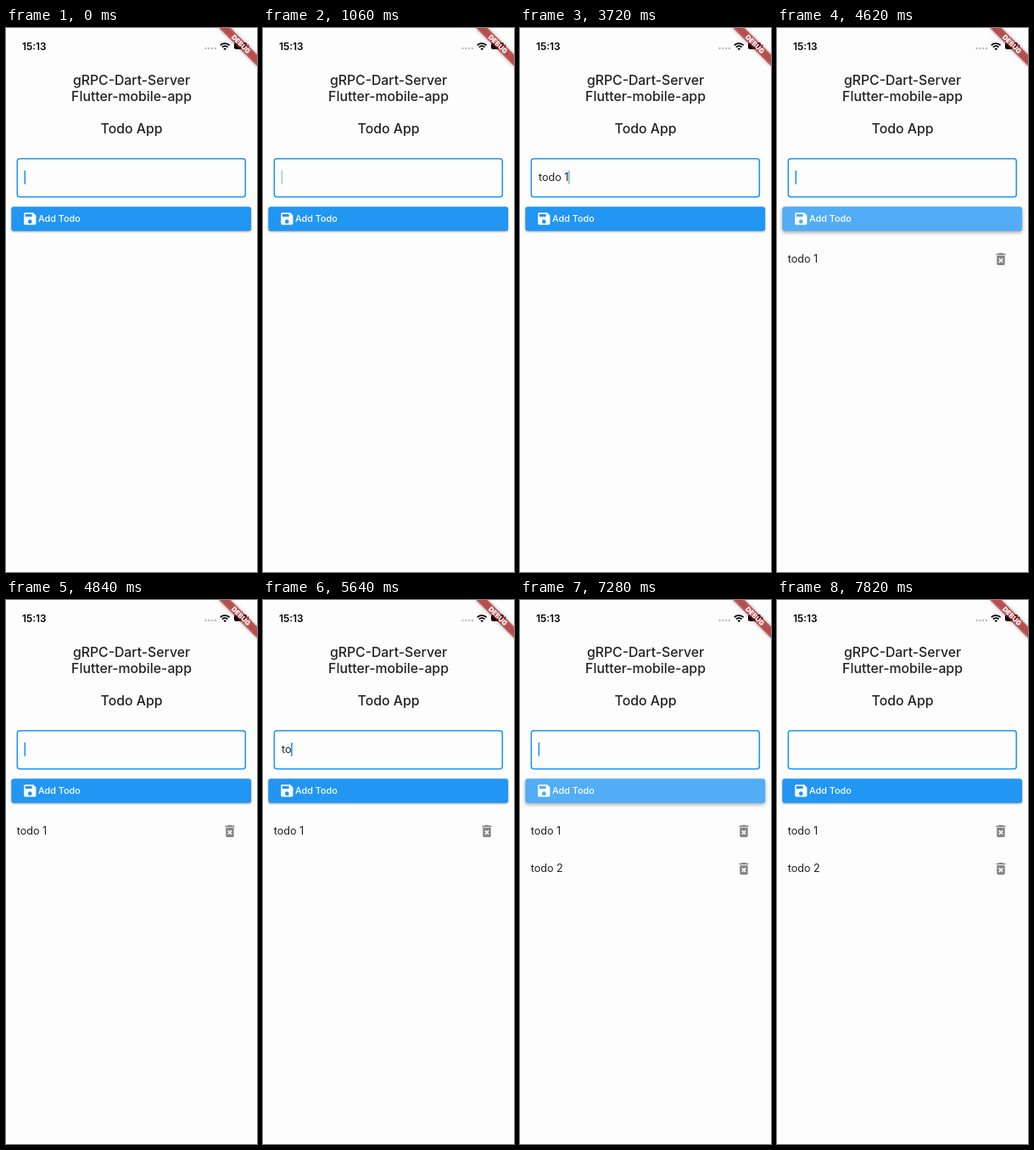
An HTML page for the animation above (8 s loop, 296 px wide and 640 px high).

```html
<!DOCTYPE html>
<html lang="en">
<head>
<meta charset="utf-8">
<title>Todo App</title>
<style>
  html, body { margin: 0; width: 100%; height: 100%; overflow: hidden; background: #fdfdfd; }
  svg { display: block; width: 296px; height: 640px; font: 12.6px Inter, "Open Sans", sans-serif; fill: #222; }
  .title { font-size: 15.8px; font-weight: 500; text-anchor: middle; }
  #typed { white-space: pre; }
</style>
</head>
<body>
<svg viewBox="0 0 296 640">
  <defs>
    <path id="trash" fill="#858585" d="M6 19c0 1.1.9 2 2 2h8c1.1 0 2-.9 2-2V7H6v12zm2.46-7.12l1.41-1.41L12 12.59l2.12-2.12 1.41 1.41L13.41 14l2.12 2.12-1.41 1.41L12 15.41l-2.12 2.12-1.41-1.41L10.59 14l-2.13-2.12zM15.5 4l-1-1h-5l-1 1H5v2h14V4z"/>
    <clipPath id="inside"><rect x="6.3" y="210.3" width="282.8" height="28.4" rx="3"/></clipPath>
  </defs>

  <!-- Status bar -->
  <g fill="#000">
    <text x="19" y="26" font-size="11.8" font-weight="600">15:13</text>
    <g fill="#bbb">
      <circle cx="235.5" cy="24" r="1.2"/><circle cx="239.3" cy="24" r="1.2"/>
      <circle cx="243.1" cy="24" r="1.2"/><circle cx="246.9" cy="24" r="1.2"/>
    </g>
    <g fill="none" stroke="#000" stroke-width="1.8">
      <path d="M252.8 20.3a7.6 7.6 0 0 1 10.8 0M254.9 22.6a4.7 4.7 0 0 1 6.6 0"/>
    </g>
    <path d="M258.2 26.2l-1.8-1.9a2.6 2.6 0 0 1 3.6 0z"/>
    <rect x="269" y="17" width="15" height="8" rx="2.2"/>
    <rect x="285" y="19.5" width="1.2" height="3" rx=".6"/>
  </g>

  <!-- Corner banner -->
  <g transform="translate(296 0) rotate(45)">
    <rect x="-32" y="22.1" width="64" height="9.5" fill="#b71c1c" fill-opacity=".67" style="filter:drop-shadow(0 0 2px #0007)"/>
    <text y="29.7" font-size="8" font-weight="900" fill="#fff" text-anchor="middle">DEBUG</text>
  </g>

  <g class="title">
    <text x="148" y="67">gRPC-Dart-Server</text>
    <text x="148" y="86">Flutter-mobile-app</text>
    <text x="148" y="124">Todo App</text>
  </g>

  <!-- Input -->
  <rect x="13.3" y="153.7" width="269" height="45" rx="3" fill="none" stroke="#2196f3" stroke-width="1.6"/>
  <text id="typed" x="22" y="180"></text>
  <rect id="cursor" y="167.7" width="1.6" height="16" rx=".5" fill="#2196f3"/>

  <!-- Button -->
  <rect id="button" x="6.3" y="210.3" width="282.8" height="28.4" rx="3" fill="#2196f3"/>
  <g clip-path="url(#inside)" fill="#fff">
    <rect id="glow" x="6" y="210" width="284" height="29"/>
    <circle id="splash" cx="130" cy="225"/>
  </g>
  <path fill="#fff" transform="translate(18.8 215) scale(.79)" d="M17 3H5c-1.11 0-2 .9-2 2v14c0 1.1.89 2 2 2h14c1.1 0 2-.9 2-2V7l-4-4zm-5 16c-1.66 0-3-1.34-3-3s1.34-3 3-3 3 1.34 3 3-1.34 3-3 3zm3-10H5V5h10v4z"/>
  <text x="38" y="228.4" font-size="10.8" font-weight="500" fill="#fff">Add Todo</text>

  <!-- List -->
  <g class="item">
    <text x="12.7" y="276">todo 1</text>
    <use href="#trash" transform="translate(254.5 262.4) scale(.79)"/>
  </g>
  <g class="item">
    <text x="12.7" y="320">todo 2</text>
    <use href="#trash" transform="translate(254.5 306.6) scale(.79)"/>
  </g>
</svg>
<script>
const LOOP = 8000, FADE = 150;
const typing = [
  [0, ''], [2150, 'o'], [2370, ''], [2480, 't'], [2590, 'to'], [2700, 'tod'], [2820, 'todo'],
  [3060, 'todo '], [3170, 'todo 1'], [4510, ''],
  [5410, 't'], [5640, 'to'], [5750, 'tod'], [5860, 'todo'], [5970, 'todo '], [6090, 'todo 2'], [7170, '']
];
// Times at which the cursor starts to fade in or out
const blinks = [
  [-80, 0], [340, 1], [690, 0], [1020, 1], [1350, 0], [1770, 1],
  [3690, 0], [4050, 1], [5030, 0], [5260, 1], [6700, 0], [7020, 1], [7690, 0]
];
const presses = [
  { down: 4050, up: 4630, added: 4510 },
  { down: 7040, up: 7300, added: 7170 }
];

const get = id => document.getElementById(id);
const typed = get('typed'), cursor = get('cursor'), button = get('button');
const glow = get('glow'), splash = get('splash');
const items = document.querySelectorAll('.item');

const ramp = (t, start, length) => Math.min(1, Math.max(0, (t - start) / length));
const easeOut = p => 1 - (1 - p) ** 2;
const latest = (list, t) => list.filter(([start]) => start <= t).pop();

function cursorAlpha(t, typedAt) {
  const [start, on] = latest(blinks, t);
  if (typedAt > start) return 1;
  const p = easeOut(ramp(t, start, FADE));
  return on ? p : 1 - p;
}

function draw(t) {
  const [typedAt, text] = latest(typing, t);
  if (typed.textContent !== text) typed.textContent = text;
  cursor.setAttribute('x', 21.5 + (text ? typed.getComputedTextLength() : 0));
  cursor.setAttribute('opacity', cursorAlpha(t, typedAt));

  const press = presses.find(p => t >= p.down && t < p.up + 220);
  const level = press ? easeOut(ramp(t, press.down, 180)) * (1 - ramp(t, press.up, 210)) : 0;
  glow.setAttribute('opacity', .13 * level);
  splash.setAttribute('opacity', .1 * level);
  splash.setAttribute('r', press ? 20 + 160 * easeOut(ramp(t, press.down, 260)) : 0);
  button.style.filter = `drop-shadow(0 ${1.2 + level}px ${1 + level}px rgba(0,0,0,.35))`;

  items.forEach((item, i) => item.setAttribute('visibility', t >= presses[i].added ? 'visible' : 'hidden'));
}

const begin = performance.now();
function tick() {
  draw((performance.now() - begin) % LOOP);
  requestAnimationFrame(tick);
}
tick();
</script>
</body>
</html>
```
